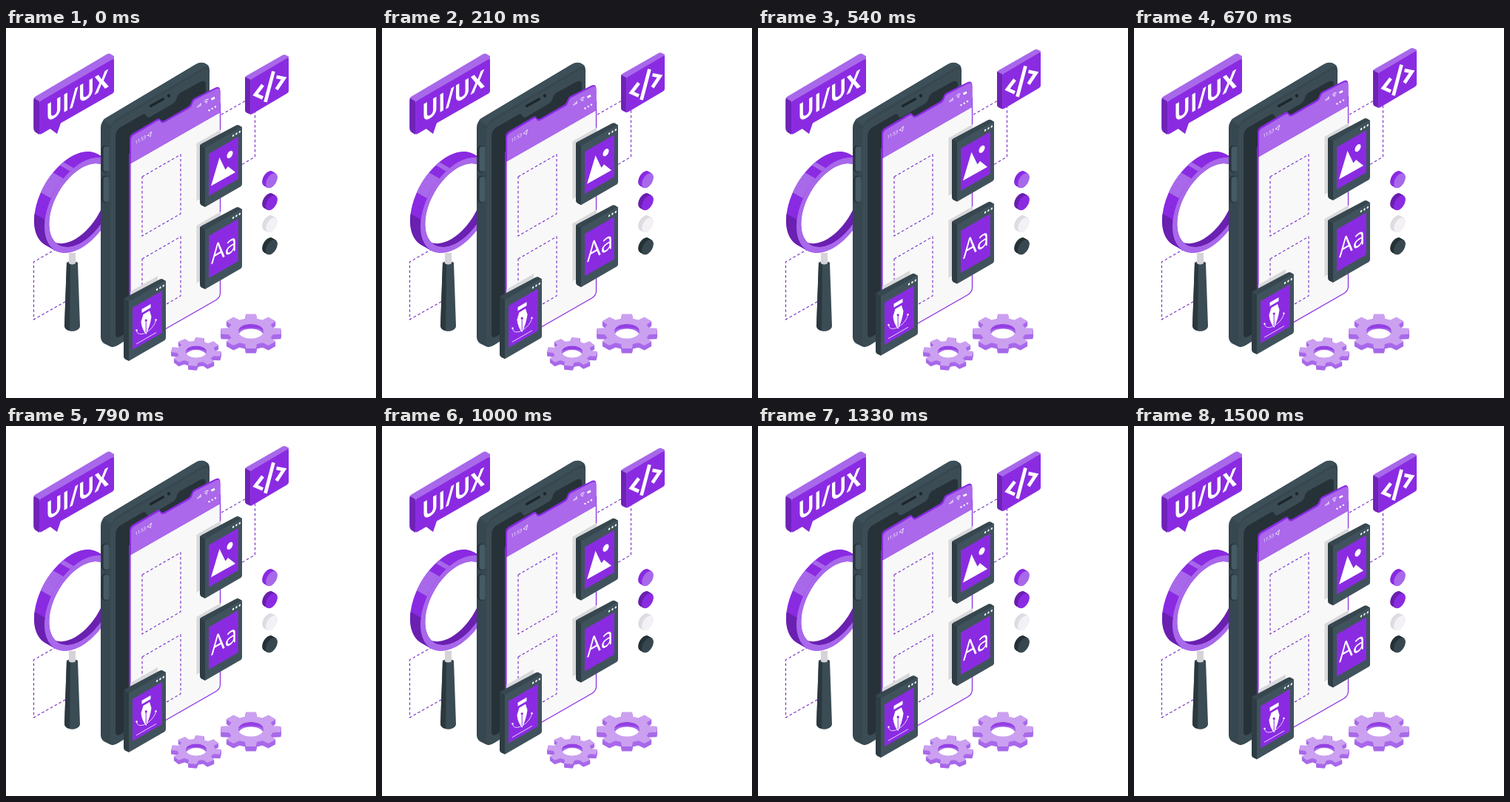
An HTML page for the animation above (1540 ms loop, 500x500 px).

```html
<!DOCTYPE html>
<html lang="en">
<head>
<meta charset="utf-8">
<title>UI/UX</title>
<style>
html, body { margin: 0; width: 100%; height: 100%; overflow: hidden; background: #fff; }
svg { display: block; width: 100vw; height: 100vh; }
text { font-family: "Open Sans", "Noto Sans", sans-serif; fill: #fff; }
.dash { fill: none; stroke: #7429c4; stroke-width: 1.1; stroke-dasharray: 3.6 3; }
.white { fill: none; stroke: #fff; }
</style>
</head>
<body>
<svg viewBox="0 0 500 500">
  <defs>
    <clipPath id="panel"><path d="M168 140L290 70V361L168 433Z"/></clipPath>
    <clipPath id="lens"></clipPath>
  </defs>

  <path class="dash" d="M85 289L37.5 316V394L80 370"/>
  <g id="magnifier"></g>
  <path d="M82 317Q89.5 312 97 317L100 403C99 412 80 412 79 403Z" fill="#3b4c54"/>
  <path d="M82 317Q84 319 87 320L86 409Q80 408 79 403Z" fill="#2b383e"/>
  <path d="M85 304H94V318Q89.5 321 85 318Z" fill="#d5d3d8"/>

  <g id="phone">
    <path d="M128 135Q128 126 136 121L255 50Q264 44 271 49Q275 51 275 57V350L152 428Q145 433 140 430L132 426Q128 423 128 417Z" fill="#37474f"/>
    <path d="M131 125Q133 122 136 121L255 50Q264 44 271 49L274 52Q269 52 263 56L150 122Q145 125 143 132Z" fill="#3d4f58"/>
    <path d="M141 145Q141 131 151 125L263 59Q275 52 275 64V350L152 428Q141 434 141 423Z" fill="#3b4c54"/>
    <path d="M148 148Q148 138 155 134L184 117Q189 115 190 119Q191 122 195 120L226 102Q230 99 231 94Q232 90 235 88L262 73Q270 69 270 77V350L154 417Q148 420 148 413Z" fill="#263238"/>
    <path d="M195.5 105.5L212.5 96" stroke="#1c262b" stroke-width="3.2" stroke-linecap="round"/>
    <circle cx="220" cy="91.5" r="2.2" fill="#1c262b"/>
    <g fill="#263238"><rect x="129" y="159" width="10" height="36" rx="5"/><rect x="129" y="200" width="10" height="36" rx="5"/></g>
    <g fill="#455a64"><rect x="131.5" y="160" width="8" height="34" rx="4"/><rect x="131.5" y="201" width="8" height="34" rx="4"/></g>
  </g>

  <path class="dash" d="M291 117L336.5 91V174L318 185"/>

  <g class="float">
    <path d="M167.5 172L289.5 102V358Q289.5 364 284 367.5L173 431Q167.5 434 167.5 428Z" fill="#f8f8f9" stroke="#8a2be2" stroke-width="1.2"/>
    <path d="M167.3 170V430" stroke="#8a2be2" stroke-width="2.4"/>
    <path d="M167 184V150Q167 145 171 142.5L205 122.500Q207.500 121.500 208.500 123.500Q210 127 214 125L246 106.500Q249.500 104 250.500 100Q251.500 96.500 254 95L283 80.500Q289.5 77.500 289.5 85.500V114Z" fill="#8a2be2"/>
    <path d="M169 183V151.5Q169 147 173 144.5L205 125.500Q207.500 124 208.500 126Q210 129.500 214.500 127.500L247 109Q251 106.500 252 102Q253 98.500 255.500 97L283.5 82.5Q289.5 80 289.5 87V114Z" fill="#ab68eb"/>
    <text transform="matrix(.866 -.5 0 1 174.5 157.5)" font-size="6.6">11:53</text>
    <path d="M191 145.5L196.5 140L195 147L193.5 145.5Z" class="white" stroke-width=".8"/>
    <path d="M259 107.5V105.5M261 106.5V103.5M263 105.5V101.5" class="white" stroke-width="1.1"/>
    <path d="M268 99.5Q270.5 95 273.5 96.5M269.3 100.7Q271 98 272.6 98.8" class="white" stroke-width="1"/>
    <circle cx="271" cy="101" r=".8" fill="#fff"/>
    <path d="M277.5 96.5L282 94" stroke="#fff" stroke-width="2.7"/>
    <g fill="#fff"><circle cx="274.5" cy="111.3" r="1.2"/><circle cx="278.7" cy="108.9" r="1.2"/><circle cx="282.9" cy="106.5" r="1.2"/></g>
  </g>

  <path class="dash" d="M184 201L236 171V251L184 281Z"/>
  <path class="dash" d="M184 312L236 282V362L184 392Z"/>

  <g id="bubble">
    <path d="M39 97Q37 95 39 93L137 35Q139 34 141 35L146 38V60L45 120V143L40 140Q37 138 37 135V97Z" fill="#a868ea"/>
    <path d="M37.5 94.5L45 99V144L40 141Q37.5 139 37.5 136Z" fill="#6f22b8"/>
    <path d="M57 134L69 143L63 131Z" fill="#6f22b8"/>
    <path d="M45 102Q45 100 47 98.6L143 42.8Q146 41 146 44V85Q146 87 144 88.5L74 128.5L69 143L61 135.5L48 143Q45 144.5 45 142Z" fill="#8a2be2"/>
    <text transform="matrix(.866 -.5 0 1 96.5 103.5)" text-anchor="middle" font-size="33.5" font-weight="700">UI/UX</text>
  </g>

  <g id="discs"></g>
  <g id="gears"></g>

  <g class="float">
    <g id="cards"></g>
    <g id="sign">
      <path d="M323 68Q323 65.5 325 64.5L374 36.5Q376 35.5 378 36.5L382 38.5V60L331 90V117L323 112Z" fill="#a868ea"/>
      <path d="M323 66L330.5 70V117L325 114.5Q323 113 323 111Z" fill="#6f22b8"/>
      <path d="M330.5 72Q330.5 70 332 69L379.5 41Q382 39.5 382 42V85Q382 87 380 88.2L333 116Q330.5 117.5 330.5 115Z" fill="#8a2be2"/>
      <path d="M347 77L337 90L347 94.5M361.5 58.5L350.5 100M365.5 66L375.5 68L365.5 83" class="white" stroke-width="4.7"/>
    </g>
  </g>
</svg>
<script>
const $ = id => document.getElementById(id);
const LIGHT = '#a868ea', MAIN = '#8a2be2', DEEP = '#6a20b0';

// Point at angle t of an upright circle of radius r
function at(x, y, r, t) {
  const c = r * Math.cos(t);
  return (x + .866 * c).toFixed(2) + ' ' + (y - .5 * c + r * Math.sin(t)).toFixed(2);
}

function arc(x, y, r, a, b) {
  const n = 72, points = [];
  for (let i = 0; i <= n; i++) points.push(at(x, y, r, a + (b - a) * i / n));
  return points.join('L');
}

const disc = (x, y, r) => 'M' + arc(x, y, r, 0, 2 * Math.PI) + 'Z';
const path = (d, fill, extra = '') => `<path d="${d}" fill="${fill}" ${extra}/>`;

// Layers of one shape from (dx, dy) back to the front
function extrude(d, fill, dx, dy, n) {
  let s = '';
  for (let i = n; i > 0; i--) {
    s += path(d, fill, `fill-rule="evenodd" transform="translate(${dx * i / n} ${dy * i / n})"`);
  }
  return s;
}

function magnifier() {
  const x = 102, y = 239.5, r = 57.7, hole = 50.5, dx = -14, dy = -8;
  const band = (a, b, fill) =>
    path('M' + arc(x, y, r, a, b) + 'L' + arc(x + dx, y + dy, r, b, a) + 'Z', fill);
  $('lens').innerHTML = path(disc(x, y, hole), '#000');
  $('magnifier').innerHTML =
    extrude(disc(x, y, r), MAIN, dx, dy, 20) +
    band(2.36, 3.3, DEEP) + band(3.75, 4.2, LIGHT) + band(4.4, 4.5, LIGHT) +
    path(disc(x, y, hole), DEEP) +
    `<g clip-path="url(#lens)">${path(disc(x + dx * .6, y + dy * .6, hole), '#fff')}</g>` +
    path(disc(x, y, r) + disc(x, y, hole), LIGHT, 'fill-rule="evenodd"');
}

function gear(x, y, rx, depth, hole, turn) {
  const k = .577, teeth = 8;
  let d = '';
  for (let i = 0; i < teeth; i++) {
    for (const [a, q] of [[-.26, .75], [-.17, 1], [.17, 1], [.26, .75]]) {
      const t = i * 2 * Math.PI / teeth + a + turn;
      d += (d ? 'L' : 'M') + (x + rx * q * Math.cos(t)).toFixed(2) + ' ' + (y + k * rx * q * Math.sin(t)).toFixed(2);
    }
  }
  const ry = hole * k, l = x - hole, r = x + hole;
  d += `ZM${l} ${y}A${hole} ${ry} 0 0 1 ${r} ${y}A${hole} ${ry} 0 0 1 ${l} ${y}Z`;
  const wall = `M${l} ${y}A${hole} ${ry} 0 0 1 ${r} ${y}A${hole} ${ry - depth * .8} 0 0 0 ${l} ${y}Z`;
  return extrude(d, LIGHT, 0, depth, 8) + path(wall, '#9440e4') +
    path(d, '#cba0f0', 'fill-rule="evenodd"');
}

// Window card; its own place is that of the picture card
function card(dx, dy, icon) {
  const move = `transform="translate(${dx} ${dy})"`;
  const dots = [44, 49, 54].map(x => `<circle cx="${x}" cy="5.4" r="1.4" fill="#fff"/>`).join('');
  return `<g clip-path="url(#panel)">${path('M257.500 156L308 127V205L257.500 234Z', '#d9d9dc', move)}</g><g ${move}>` +
    path('M262 159Q262 157.5 264 156.5L311 131.5Q313 130.5 315 131.5L319 134L269 163Z', '#37474f') +
    path('M262 158L269 162V242L264 239.5Q262 238.5 262 236Z', '#2e3c43') +
    path('M269 162L319 133.5V211Q319 213 317 214.2L269 242Z', '#40535c') +
    `<g transform="matrix(.866 -.5 0 1 269 162)"><rect x="5.8" y="11" width="46" height="57" fill="${MAIN}"/>${dots}</g></g>` +
    icon;
}

const picture = path('M277 213.5L288.5 175L296.5 191.5L300 187L310 195Z', '#fff') +
  path(disc(302.5, 171, 4.6), '#fff');
const letters = '<text transform="matrix(.866 -.5 0 1 294.5 309.5)" text-anchor="middle" font-size="34">Aa</text>';
const pen = path('M183.5 380L195.5 373V378L183.5 385Z', '#fff') +
  path('M185.5 387L194 382L196.5 390Q195 402 189.3 414Q183.500 407 182.500 397Z', '#fff') +
  `<path d="M189.2 412V396" stroke="${MAIN}"/><circle cx="189.2" cy="395" r="1.6" fill="${MAIN}"/>` +
  '<path d="M176.5 409C178 420 199 410 202.5 395M176 427L203 411.5" class="white" stroke-width=".8"/>' +
  '<g fill="#fff"><circle cx="176.5" cy="408.5" r="1.2"/><circle cx="202.5" cy="394.5" r="1.2"/></g>';

magnifier();
$('discs').innerHTML = [[LIGHT, MAIN], [MAIN, DEEP], ['#f3f1f5', '#dedce1'], ['#37474f', '#263238']]
  .map(([front, side], i) => {
    const d = disc(359, 206.3 + 30 * i, 9);
    return extrude(d, side, -5, -3, 10) + path(d, front);
  }).join('');
$('gears').innerHTML = gear(331, 409.8, 41, 6.5, 17, 0) + gear(257, 437.5, 34, 5.6, 14, .15);
$('cards').innerHTML = card(0, 0, picture) + card(0, 111, letters) + card(-103, 208, pen);

const LOOP = 1540, FPS = 24, PEAK = .735, SPEED = 40 / 3;
const floats = document.querySelectorAll('.float');
const start = n => Math.round(n * 100 / FPS) * 10;

function draw(ms) {
  const t = ms % LOOP;
  let n = Math.floor(t * FPS / 1000) + 1;
  if (start(n) > t) n--;
  const y = SPEED * Math.abs(Math.min(n, 36) / FPS - PEAK) - SPEED * PEAK;
  for (const g of floats) g.setAttribute('transform', `translate(0 ${y.toFixed(3)})`);
}

let zero;
function tick(now) {
  zero ??= now;
  draw(now - zero);
  requestAnimationFrame(tick);
}
draw(0);
requestAnimationFrame(tick);
</script>
</body>
</html>
```
